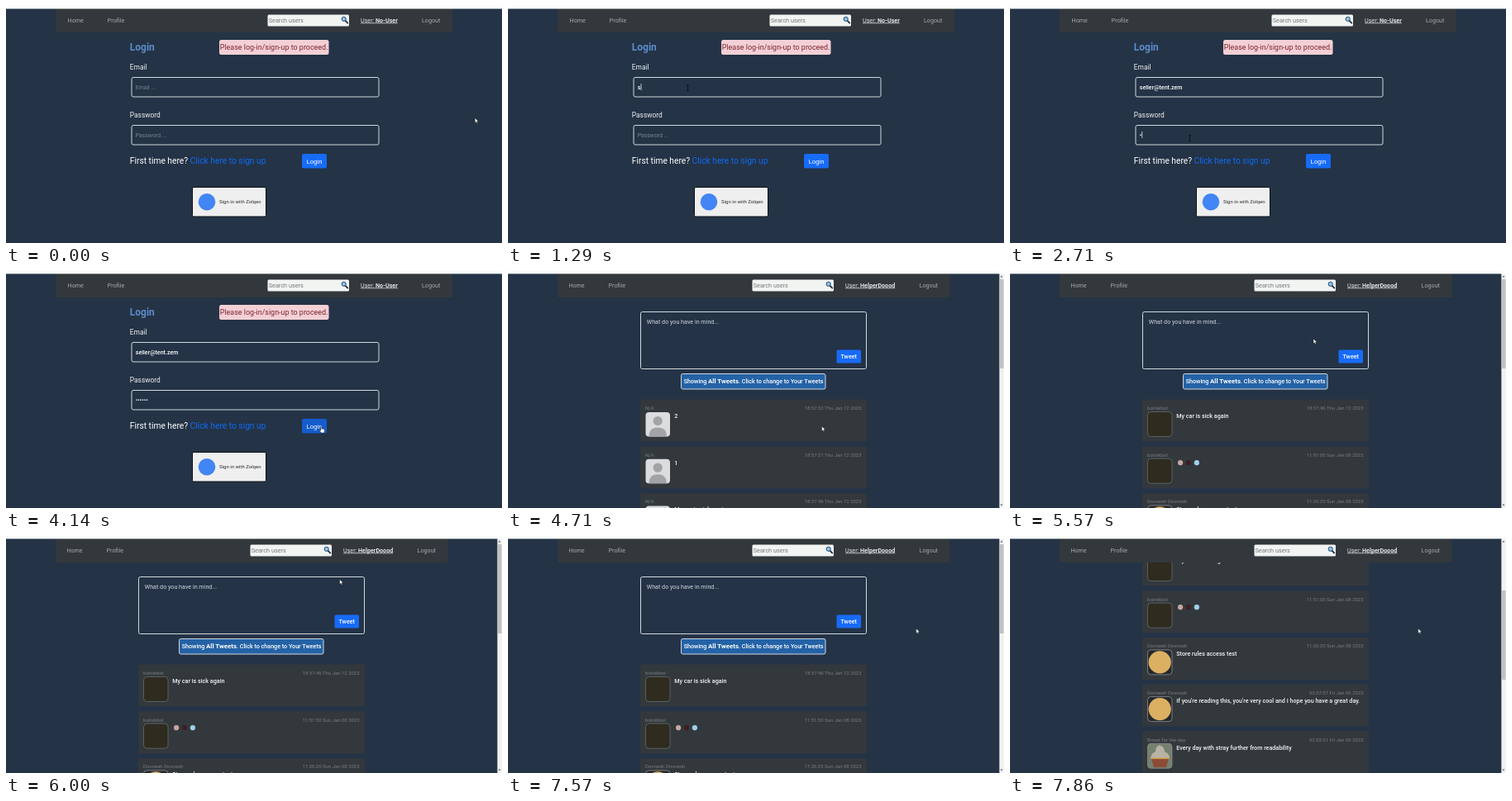
Write an HTML page that moves like this. It is 600 px wide and 287 px high and loops after 8 s.

```html
<!DOCTYPE html>
<html lang="en">
<head>
<meta charset="utf-8">
<title>Log in and read the feed</title>
<style>
html, body { margin: 0; width: 100%; height: 100%; overflow: hidden; background: #243346; }
svg { display: block; width: 100%; height: 100%; font-family: Roboto, sans-serif; }
.dialog { font-family: "Open Sans", "Noto Sans", sans-serif; }
</style>
</head>
<body>
<svg id="stage" viewBox="0 0 600 287"></svg>
<script>
const LOOP = 8000, STEP = 1000 / 7, PITCH = 56.7, SCROLL = 146, FEED_TOP = -.5;
const PANEL = '#33383c', BLUE = '#176bf8', BODY = 7.17;

const text = (x, y, size, fill, str, attrs = '') =>
  `<text x="${x}" y="${y}" font-size="${size}" fill="${fill}" ${attrs}>${str}</text>`;
const rect = (x, y, w, h, fill, attrs = '') =>
  `<rect x="${x}" y="${y}" width="${w}" height="${h}" fill="${fill}" ${attrs}/>`;
const circle = (x, y, r, fill, attrs = '') =>
  `<circle cx="${x}" cy="${y}" r="${r}" fill="${fill}" ${attrs}/>`;
const group = (id, content, attrs = '') => `<g id="${id}" ${attrs}>${content}</g>`;
const outline = 'rx="2" stroke="#d3d8dd" stroke-width="1"';
const medium = 'font-weight="500"';
const centred = 'text-anchor="middle"';

function header(width, home, search, user, logout, name) {
  const lens = search + 92.2;
  return rect(60, 3, width, 29, PANEL) +
    text(home, 19.5, BODY, '#a5aaae', 'Home') +
    text(home + 48.2, 19.5, BODY, '#a5aaae', 'Profile') +
    rect(search, 10.5, 98.5, 14, '#f2f4f2', 'rx="1.5"') +
    text(search + 1.2, 19.5, 7.3, '#74787b', 'Search users') +
    `<path d="M${lens + 1.6} 17.6l3 3" stroke="#1d2b3a" stroke-width="1.8" stroke-linecap="round"/>` +
    circle(lens, 15.8, 2.6, '#8fc3ea', 'stroke="#24486b" stroke-width="1"') +
    text(user, 19.5, BODY, '#e3e6e8', `User: <tspan font-weight="700">${name}</tspan>`, 'text-decoration="underline"') +
    text(logout, 19.5, BODY, '#a5aaae', 'Logout');
}

function field(y, id, hint) {
  return rect(152, y, 299, 23.5, 'none', outline) +
    text(156.8, y + 14, 6.85, '#79838e', hint, `id="${id}Hint"`) +
    text(156.8, y + 14, 7.08, '#fff', '', `id="${id}" ${medium}`);
}

const pictures = {
  blank: rect(166.5, 171.5, 29.5, 29.5, '#dcdcde', 'rx="4"') +
    circle(181.2, 182, 5.6, '#a2a3a7') +
    '<path d="M170.5 201q0-11 10.7-11t10.7 11z" fill="#a2a3a7"/>',
  dark: rect(166.5, 171, 29.5, 30, '#2f2b1f', 'rx="4" stroke="#6c747a" stroke-width=".7"'),
  face: rect(166.5, 171, 29.5, 30, '#25292d', 'rx="4" stroke="#9a9fa3" stroke-width=".7"') +
    circle(181.2, 186, 13.6, '#dcb062'),
  cake: rect(166.5, 171, 29.5, 30, '#75806f', 'rx="4" stroke="#8d9296" stroke-width=".7"') +
    '<path d="M170 189q1-7 6-8 0-7 5-8 6 2 6 8 6 2 6 8z" fill="#b9b2a6"/>' +
    '<path d="M171 189h21l-3 11h-15z" fill="#8c4b35"/>' +
    '<path d="M170.5 189h22" stroke="#cfa04e" stroke-width="1.6"/>'
};

function card([name, date, message, picture], i) {
  const icons = ['#c9a6a0', '#3b2023', '#9fd0ee'].map((c, k) => circle(206.1 + k * 9.9, 176, 3.1, c)).join('');
  return `<g transform="translate(0 ${i * PITCH})">` +
    rect(160, 156, 274, 51, PANEL, 'rx="1.5"') +
    text(166, 168.4, 6.1, '#777d82', name) +
    text(427.6, 168.4, 5.97, '#777d82', date, 'text-anchor="end"') +
    pictures[picture] +
    (message ? text(201.3, 178.4, BODY, '#f4f5f6', message, medium) : icons) + '</g>';
}

const loading = [
  ['N/A', '18:57:32 Thu Jan 12 2023', '2', 'blank'],
  ['N/A', '18:57:21 Thu Jan 12 2023', '1', 'blank'],
  ['N/A', '18:37:46 Thu Jan 12 2023', 'My car is sick again', 'blank']
];
const posts = [
  ['bolnikbol', '18:37:46 Thu Jan 12 2023', 'My car is sick again', 'dark'],
  ['bolnikbol', '11:51:50 Sun Jan 08 2023', '', 'dark'],
  ['Dovnesh Dovnesh', '11:26:20 Sun Jan 08 2023', 'Store rules access test', 'face'],
  ['Dovnesh Dovnesh', '02:07:57 Fri Jan 06 2023', "If you're reading this, you're very cool and I hope you have a great day.", 'face'],
  ['Bread for the day', '02:03:21 Fri Jan 06 2023', 'Every day with stray further from readability', 'cake']
];

const loginPage = group('loginPage',
  header(480, 74.6, 316.5, 429, 503, 'No-User') +
  text(149.8, 54, 12, '#5b8dc9', 'Login', 'font-weight="700"') +
  rect(258, 41, 132.5, 18, '#f3d0d5', 'rx="2.5"') +
  text(258.8, 53.2, 8.95, '#7f2530', 'Please log-in/sign-up to proceed.') +
  text(149.8, 76.8, 8.4, '#eef0f2', 'Email') +
  field(86.5, 'email', 'Email ...') +
  text(149.8, 134.6, 8.4, '#eef0f2', 'Password') +
  field(144.5, 'pass', 'Password ...') +
  rect(0, 152, .7, 8, '#fff', 'id="caret"') +
  text(149.8, 191.2, 10.24, '#fff', 'First time here? <tspan fill="#0f6bf5">Click here to sign up</tspan>') +
  rect(358, 179, 30, 17.5, BLUE, 'rx="2" id="loginButton"') +
  text(373, 190.6, 7.68, '#fff', 'Login', centred) +
  rect(225.5, 219.5, 89, 35.5, '#efefef', 'rx="1.5" stroke="#0c1118" stroke-width="1"') +
  circle(243, 237.2, 10.3, '#4285f4') +
  text(258, 239.2, 6, '#2b2b2b', 'Sign in with Zolqen'));

const feedPage = group('feedPage',
  group('scroller',
    rect(160.5, 50, 273, 69, 'none', outline) +
    text(167.8, 64.5, BODY, '#d3d8dd', 'What do you have in mind...') +
    rect(397.5, 96, 29.5, 16, BLUE, 'rx="1.5"') +
    text(412.2, 106.2, BODY, '#fff', 'Tweet', `${centred} ${medium}`) +
    rect(209.5, 125, 174.5, 18.5, '#2462a6', outline) +
    text(212.7, 136.6, BODY, '#fff', 'Showing <tspan font-weight="700" font-size="7.9">All Tweets</tspan>. Click to change to Your Tweets', medium) +
    group('loading', loading.map(card).join('')) +
    group('posts', posts.map(card).join(''))) +
  header(474.5, 73.4, 295.5, 408, 497.6, 'HelperDoood') +
  rect(594.4, 3, 5.6, 284, '#f1f1f1') +
  rect(594.8, 10, 4.8, 108, '#c1c1c1', 'id="thumb"') +
  '<path d="M595.5 7.5l1.5-2 1.5 2zM595.5 282.5l1.5 2 1.5-2z" fill="#606060"/>');

const dialog = group('dialog',
  rect(215, -6, 170, 101, '#eceef2', 'rx="2"') +
  '<path d="M217 4q9 14 22 5t12-12M221 24q8-6 22-2t20-1M318 24q14-8 34-6t28-14" fill="none" stroke="#c9ccd1" stroke-width=".9"/>' +
  rect(260, 2, 52, 20, '#e2e5ea', 'rx="3"') +
  '<path d="M271 4l7.5 13.5h-15z" fill="#d3302f" stroke="#d3302f" stroke-width="1.4" stroke-linejoin="round"/>' +
  rect(270.3, 8, 1.5, 5, '#fff') + rect(270.3, 14.2, 1.5, 1.5, '#fff') +
  [282.5, 287.8, 293].map(x => circle(x, 12.2, 1.8, '#3577d4')).join('') +
  rect(297, 9.4, .8, 5.6, '#7d8894') +
  text(221.5, 44, 5.47, '#27292c', 'Change your password') +
  text(221.5, 58, 4.2, '#5a5d61', 'The password you just used was found in a data breach. Zolqen Password') +
  text(221.5, 65.2, 4.2, '#5a5d61', 'Manager recommends changing your password now.') +
  circle(225.6, 83, 2.4, 'none', 'stroke="#55585c" stroke-width=".7"') +
  rect(225.3, 82.5, .7, 1.9, '#55585c') + rect(225.3, 81.3, .7, .7, '#55585c') +
  rect(354.8, 76.8, 24.4, 12.2, '#2368c6', 'rx="1.5" stroke="#17468c" stroke-width="1"') +
  text(367, 84.7, 4.6, '#fff', 'OK', `${centred} font-weight="600"`),
  'class="dialog"');

const pointer = group('pointer',
  '<path id="arrow" d="M0 0v6l1.4-1.3 1 2.1 1-.5-1-2h2z" fill="#fff" stroke="#10151c" stroke-width=".5"/>' +
  '<path id="beam" d="M-1.5-3.5h3M0-3.5v7M-1.5 3.5h3" fill="none" stroke="#0b0f15" stroke-width=".8"/>' +
  '<path id="hand" d="M-.6.2q.6-.7 1.2 0v2.8l2.6.6q.9.3.7 1.4l-.6 3h-3.6l-2-3.1q.2-1 1.7.1z" fill="#fff" stroke="#10151c" stroke-width=".5"/>');

const stage = document.getElementById('stage');
stage.innerHTML = rect(0, 0, 600, 287, '#243346') + loginPage + feedPage +
  rect(0, 0, 600, 3.4, '#fbfffc') + dialog + pointer;

const el = {};
stage.querySelectorAll('[id]').forEach(node => el[node.id] = node);
const show = (node, on) => node.setAttribute('display', on ? 'inline' : 'none');
const clamp = (v, lo, hi) => Math.min(hi, Math.max(lo, v));
const ease = p => p * p * (3 - 2 * p);
const ramp = (t, a, b) => clamp((t - a) / (b - a), 0, 1);
const typed = (t, start, gap, max) => clamp(Math.floor((t - start) / gap) + 1, 0, max);

// time, x, y
const route = [
  [100, 567.2, 135.5], [860, 217.5, 99], [1950, 217.5, 99], [2290, 217.5, 160],
  [3500, 217.5, 160], [4000, 381.5, 188], [4420, 381.5, 188], [4440, 379.5, 188],
  [5060, 379.5, 188], [5430, 367, 82], [5580, 367, 82], [5960, 403.6, 52.5],
  [6060, 403.6, 52.5], [6500, 513, 92], [6860, 493.7, 112]
];

function pointerAt(t) {
  const i = route.findIndex(p => p[0] > t);
  if (i < 0) return route[route.length - 1].slice(1);
  if (!i) return route[0].slice(1);
  const [t0, x0, y0] = route[i - 1], [t1, x1, y1] = route[i];
  const p = ease(ramp(t, t0, t1));
  return [x0 + (x1 - x0) * p, y0 + (y1 - y0) * p];
}

function draw(t) {
  const onFeed = t >= 4420;
  const loaded = t >= 5140;
  show(el.loginPage, !onFeed);
  show(el.feedPage, onFeed);

  const address = 'seller@tent.zem'.slice(0, typed(t, 1250, 62, 15));
  const dots = '•'.repeat(typed(t, 2640, 143, 6));
  el.email.textContent = address;
  el.pass.textContent = dots;
  show(el.emailHint, !address);
  show(el.passHint, !dots);

  const onPass = t >= 2290;
  const active = onPass ? el.pass : el.email;
  const length = onPass ? dots.length : address.length;
  el.caret.setAttribute('x', 157 + (length && !onFeed ? active.getComputedTextLength() : 0));
  el.caret.setAttribute('y', onPass ? 152 : 94);
  show(el.caret, t > 900 && t < 3700);

  show(el.loading, !loaded);
  show(el.posts, loaded);
  const scroll = ease(ramp(t, 7572, 7855));
  el.scroller.setAttribute('transform', `translate(0 ${FEED_TOP - SCROLL * scroll})`);
  el.thumb.setAttribute('y', 10 + 56 * scroll);

  show(el.dialog, t > 4900 && t < 5560);
  el.dialog.setAttribute('opacity', .91 + .09 * ramp(t, 5000, 5140));

  const [x, y] = pointerAt(t);
  const inside = (l, top, r, b) => !onFeed && x > l && x < r && y > top && y < b;
  const hover = inside(358, 179, 388, 197);
  const beam = inside(152, 86, 451, 110) || inside(152, 144, 451, 168);
  el.loginButton.setAttribute('fill', hover ? '#155ccf' : BLUE);
  el.pointer.setAttribute('transform', `translate(${x} ${y})`);
  show(el.hand, hover);
  show(el.beam, beam);
  show(el.arrow, !hover && !beam);
}

const start = performance.now();
function tick() {
  const t = (performance.now() - start) % LOOP;
  draw(Math.floor((t + 6) / STEP) * STEP % LOOP);
  requestAnimationFrame(tick);
}
tick();
</script>
</body>
</html>
```
